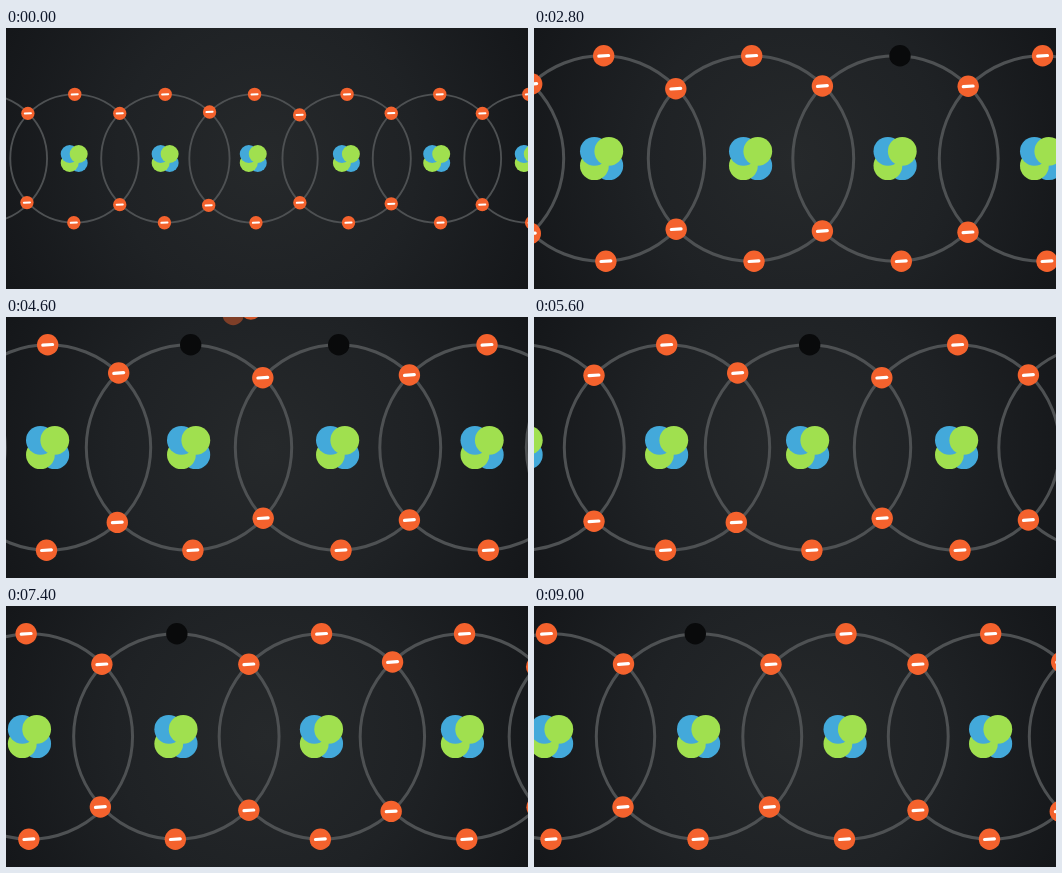
An HTML page with a canvas that plays this animation: 522x261 px, repeating every 9.1 s.

```html
<!DOCTYPE html>
<html lang="en">
<head>
<meta charset="utf-8">
<title>Hole conduction</title>
<style>
  html, body { margin: 0; width: 100%; height: 100%; overflow: hidden; background: #15171b; }
  canvas { display: block; }
</style>
</head>
<body>
<canvas id="stage" width="522" height="261"></canvas>
<script>
const ctx = document.getElementById('stage').getContext('2d');
const W = 522, H = 261, MID = 130.5;
const LOOP = 9100, STEP = 100;
const ORBIT = 102.7, DOT = 10.7, NUCLEON = 14.4;
const GREEN = '#a0e04f', BLUE = '#43a9da', ORANGE = '#f4622d', BLACK = '#090a0b', RING = '#4e5153';

// Close-up coordinates: atom centre, then x offsets of its top and bottom electrons.
const atoms = [
  [-580, -5.5, -1], [-433, -3.7, -1], [-286.5, 0.5, -1], [-141, -0.3, -1.5], [0, 1.7, 3.9],
  [149, 0.7, 3], [293.5, 4.5, 5.8], [440, 0.6, 5], [586, 0, 3]
].map(([x, top, bottom]) => ({ x, top: x + top, bottom: x + bottom }));

// Shared electrons between neighbours: top x, y and bottom x, y.
const shared = [
  [-508.5, 58, -509, 201], [-361, 58.3, -362.5, 201], [-214, 58.3, -214, 204.3],
  [-70.3, 56, -71.7, 205.4], [73.8, 60.7, 74.2, 201.2], [220.4, 58, 220.4, 203],
  [366.2, 58.3, 366, 204.3], [512, 58, 512, 203]
];

// Camera keys: time, x of the middle atom, speed in px/s.
const panKeys = [
  [1800, 40.3, 12], [3600, 110, 62], [5600, 274, 98],
  [6700, 385.5, 104], [8000, 515, 94], [9000, 598, 72], [9100, 605, 70]
];
const ZOOM_START = 930, ZOOM_END = 1800, WIDE = 0.625, WIDE_X = 247.5;

const HOP_TIME = 500, HOP_HEIGHT = 37, FIRST_DONOR = 7;
const hopStart = n => n === 0 ? 380 : 630 + 1250 * n;

const clamp = v => Math.min(1, Math.max(0, v));
const ease = p => (1 - Math.cos(Math.PI * clamp(p))) / 2;
const mix = (a, b, p) => a + (b - a) * p;

function panAt(t) {
  let i = 0;
  while (i < panKeys.length - 2 && t > panKeys[i + 1][0]) i++;
  const [t0, x0, v0] = panKeys[i], [t1, x1, v1] = panKeys[i + 1];
  const d = (t1 - t0) / 1000, u = (t - t0) / (t1 - t0), w = 1 - u;
  return x0 * w * w * (1 + 2 * u) + x1 * u * u * (3 - 2 * u) + d * u * w * (v0 * w - v1 * u);
}

function camera(t) {
  if (t >= ZOOM_END) return { scale: 1, x: panAt(t) };
  const p = ease((t - ZOOM_START) / (ZOOM_END - ZOOM_START));
  return { scale: mix(WIDE, 1, p), x: mix(WIDE_X, panKeys[0][1], p) };
}

function disc(x, y, r, color) {
  ctx.fillStyle = color;
  ctx.beginPath();
  ctx.arc(x, y, r, 0, 2 * Math.PI);
  ctx.fill();
}

function electron(x, y, alpha = 1) {
  ctx.save();
  ctx.globalAlpha = alpha;
  ctx.translate(x, y);
  disc(0, 0, DOT, ORANGE);
  ctx.rotate(-0.06);
  ctx.strokeStyle = '#fff';
  ctx.lineWidth = 3.2;
  ctx.lineCap = 'round';
  ctx.beginPath();
  ctx.moveTo(-4.9, 0);
  ctx.lineTo(4.9, 0);
  ctx.stroke();
  ctx.restore();
}

function nucleus(x) {
  const d = 7.2;
  disc(x + d - 0.4, d, NUCLEON, BLUE);
  disc(x - d - 0.4, d, NUCLEON, GREEN);
  disc(x - d - 0.4, -d, NUCLEON, BLUE);
  disc(x + d - 0.4, -d, NUCLEON, GREEN);
}

function topSite(atom, i, t) {
  const leaves = i > 0 ? hopStart(FIRST_DONOR - i) : Infinity;
  const refilled = hopStart(FIRST_DONOR + 1 - i) + HOP_TIME;
  const empty = i > 0 && i <= FIRST_DONOR && t >= leaves && (i === 1 || t < refilled);
  if (empty) disc(atom.top, -ORBIT, DOT, BLACK);
  else electron(atom.top, -ORBIT);
}

function flight(n, t) {
  const age = t - hopStart(n);
  if (age < 0 || age >= HOP_TIME) return;
  const from = atoms[FIRST_DONOR - n].top, to = atoms[FIRST_DONOR - n + 1].top;
  const at = (ms, alpha) => {
    const p = ease(ms / HOP_TIME);
    electron(mix(from, to, p), -ORBIT - 4 * HOP_HEIGHT * p * (1 - p), alpha);
  };
  at(age - 40, 0.45);
  at(age, 0.85);
}

function background() {
  const g = ctx.createRadialGradient(W / 2, H / 2, 0, W / 2, H / 2, 300);
  g.addColorStop(0, '#26292b');
  g.addColorStop(0.5, '#1f2225');
  g.addColorStop(1, '#141619');
  ctx.fillStyle = g;
  ctx.fillRect(0, 0, W, H);
}

function draw(t) {
  background();
  const cam = camera(t);
  ctx.save();
  ctx.translate(cam.x, MID);
  ctx.scale(cam.scale, cam.scale);

  ctx.strokeStyle = RING;
  ctx.lineWidth = 3;
  for (const a of atoms) {
    ctx.beginPath();
    ctx.arc(a.x, 0, ORBIT, 0, 2 * Math.PI);
    ctx.stroke();
  }
  for (const a of atoms) {
    nucleus(a.x);
    electron(a.bottom, ORBIT);
  }
  for (const [x1, y1, x2, y2] of shared) {
    electron(x1, y1 - MID);
    electron(x2, y2 - MID);
  }
  atoms.forEach((a, i) => topSite(a, i, t));
  for (let n = 0; n < FIRST_DONOR; n++) flight(n, t);
  ctx.restore();
}

const began = performance.now();
function tick() {
  const t = (performance.now() - began) % LOOP;
  draw(Math.floor(t / STEP) * STEP);
  requestAnimationFrame(tick);
}
tick();
</script>
</body>
</html>
```
